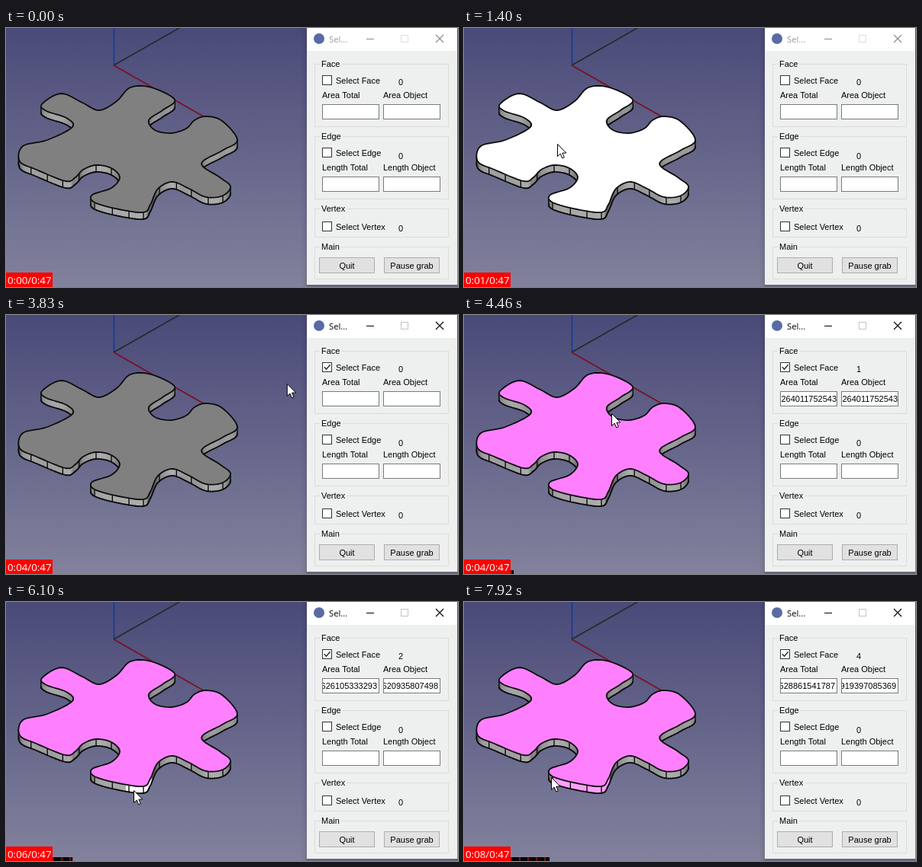
Write an HTML page with a canvas that moves like this. It is 592 px wide and 340 px high and loops after 8 s.

```html
<!DOCTYPE html>
<html lang="en">
<head>
<meta charset="utf-8">
<title>Face selection</title>
<style>
html, body { margin: 0; width: 100%; height: 100%; overflow: hidden; background: #65658b; }
canvas { display: block; }
</style>
</head>
<body>
<canvas id="stage" width="592" height="340"></canvas>
<script>
const ctx = document.getElementById('stage').getContext('2d');
const LOOP = 8000, TICK = 203, LEAD = 32;
const DEPTH = 9, INK = '#0c0c0c';
const SIDE_X = 116, SIDE_W = 21, SIDE_Y = 228;
const UI_FONT = '11px "Liberation Sans", Arial, sans-serif';
const AREAS = [
  ['', ''],
  ['264011752543', '264011752543'],
  ['626105333293', '620935807498'],
  ['627483437540', '770166446433'],
  ['528861541787', '919397085369']
];
const CLICKS = [22, 30, 32, 35];

// Pointer path: tick, x, y
const PATH = [
  [1, 372, 39], [4, 177, 108], [7, 122, 152], [8, 122, 152], [11, 385, 37], [13, 426, 77],
  [18, 426, 77], [22, 193, 129], [23, 193, 129], [26, 198, 220], [30, 167, 247],
  [34, 126, 238], [36, 126, 238], [38, 114, 230], [40, 114, 230]
];

// Key points of the top face, clockwise
const KNOTS = [
  [47, 100], [72, 86], [100, 98], [122, 108], [145, 96], [163, 78], [190, 78], [221, 94],
  [205, 108], [187, 121], [195, 134], [216, 138], [236, 132], [247, 121], [262, 116],
  [283, 122], [303, 147], [283, 161], [256, 178], [280, 196], [294, 208], [284, 220],
  [262, 222], [240, 211], [218, 202], [199, 211], [189, 232], [180, 242], [148, 238],
  [116, 229], [113, 219], [138, 210], [149, 196], [138, 184], [118, 180], [101, 186],
  [91, 196], [78, 201], [40, 186], [18, 175], [22, 155], [54, 147], [87, 130], [79, 118], [53, 109]
];

function spline(knots) {
  const n = knots.length, out = [];
  knots.forEach((b, i) => {
    const a = knots[(i + n - 1) % n], c = knots[(i + 1) % n], d = knots[(i + 2) % n];
    for (let j = 0; j < 8; j++) {
      const u = j / 8;
      out.push([0, 1].map(k => b[k] + 0.5 * u * (c[k] - a[k] + u * (2 * a[k] - 5 * b[k]
        + 4 * c[k] - d[k] + u * (3 * (b[k] - c[k]) + d[k] - a[k])))));
    }
  });
  return out;
}

function pathOf(points, closed) {
  const path = new Path2D();
  points.forEach(p => path.lineTo(p[0], p[1]));
  if (closed) path.closePath();
  return path;
}

const outline = spline(KNOTS);
const topFace = pathOf(outline, true);

function line(points, color, width = 1) {
  ctx.strokeStyle = color;
  ctx.lineWidth = width;
  ctx.stroke(pathOf(points));
}

function shape(path, fill, stroke, width = 1) {
  ctx.fillStyle = fill;
  ctx.fill(path);
  ctx.strokeStyle = stroke;
  ctx.lineWidth = width;
  ctx.stroke(path);
}

function box(x, y, w, h, fill, border) {
  ctx.fillStyle = fill;
  ctx.fillRect(x, y, w, h);
  if (border) frame(x, y, w, h, border);
}

function frame(x, y, w, h, color) {
  ctx.strokeStyle = color;
  ctx.lineWidth = 1;
  ctx.strokeRect(x + 0.5, y + 0.5, w - 1, h - 1);
}

function label(str, x, y, color = '#000', font = UI_FONT, align = 'left') {
  ctx.font = font;
  ctx.fillStyle = color;
  ctx.textAlign = align;
  ctx.fillText(str, x, y);
}

function pointerAt(tick) {
  const i = PATH.findIndex(key => key[0] > tick);
  if (i < 1) return null;
  const [a, b] = [PATH[i - 1], PATH[i]];
  const u = (tick - a[0]) / (b[0] - a[0]);
  return [1, 2].map(k => a[k] + (b[k] - a[k]) * u);
}

// Clickable side strips count from the right: 0, 1, 2
function sideAt(x, y) {
  const side = 2 - Math.floor((x - SIDE_X) / SIDE_W);
  return y > SIDE_Y && side < 3 ? Math.max(0, side) : -1;
}

function stateAt(tick) {
  const pointer = pointerAt(tick);
  const count = CLICKS.filter(c => tick >= c).length;
  const justClicked = tick >= CLICKS[0] && tick < CLICKS[0] + 2;
  const overTop = pointer && !justClicked && ctx.isPointInPath(topFace, ...pointer);
  return {
    tick, pointer, count,
    hoverSide: pointer && !overTop ? sideAt(...pointer) : -1,
    top: overTop ? '#ffffff' : count ? '#ff80ff' : '#808080',
    active: tick >= 15,
    overBox: tick >= 13 && tick <= 18
  };
}

function drawScene() {
  const sky = ctx.createLinearGradient(0, 0, 0, 340);
  sky.addColorStop(0, '#4a4a79');
  sky.addColorStop(1, '#82829d');
  box(0, 0, 592, 340, sky);
  line([[141.5, 0], [141.5, 49]], '#143a94', 1.6);
  line([[141, 49], [227, 0]], '#222b26', 1.6);
  line([[141, 49], [262, 118]], '#7c0f1e', 1.6);
}

function wallColor(x, y, facing, s) {
  const side = sideAt(x, y);
  if (side >= 0 && side === s.hoverSide) return '#ffffff';
  if (side >= 0 && side + 1 < s.count) return '#ffa2ff';
  const g = Math.round(82 + 92 * facing * facing);
  return `rgb(${g},${g},${g})`;
}

function drawPiece(s) {
  const down = p => [p[0], p[1] + DEPTH];
  const strip = x => Math.floor((x - SIDE_X) / SIDE_W);
  const walls = outline.map((a, i) => [a, outline[(i + 1) % outline.length]]);
  const isFront = ([a, b]) => b[0] < a[0];
  ctx.lineJoin = ctx.lineCap = 'round';

  walls.filter(isFront).forEach(([a, b]) => {
    const facing = (a[0] - b[0]) / Math.hypot(b[0] - a[0], b[1] - a[1]);
    const color = wallColor((a[0] + b[0]) / 2, a[1], facing, s);
    shape(pathOf([a, b, down(b), down(a)], true), color, color, 0.6);
  });
  walls.forEach((wall, i) => {
    const [a, b] = wall, front = isFront(wall);
    if (front) line([down(a), down(b)], INK, 1.8);
    const turns = front !== isFront(walls.at(i - 1));
    const seam = front && a[1] > 178 && strip(a[0]) !== strip(b[0]);
    if (turns || seam) line([a, down(a)], INK, 1.4);
  });
  shape(topFace, s.top, INK, 1.8);
  ctx.lineJoin = 'miter';
  ctx.lineCap = 'butt';
}

function group(name, y, h) {
  frame(404, y, 176, h, '#dadcdc');
  ctx.font = UI_FONT;
  box(411, y - 2, ctx.measureText(name).width + 4, 5, '#eef0f0');
  label(name, 413, y + 4);
}

function checkRow(name, y, value, valueY, checked, hot) {
  box(414, y, 13, 13, '#fff', hot ? '#2a6fa8' : '#333');
  if (checked) line([[416.8, y + 6.3], [419.5, y + 9.2], [424.6, y + 3.3]], '#222', 1.3);
  label(name, 432, y + 11);
  label(value, 514, valueY);
}

function fields(kind, y, texts, right) {
  ['Total', 'Object'].forEach((what, i) => {
    const x = 414 + i * 80;
    label(`${kind} ${what}`, x, y);
    box(x, y + 8, 75, 20, '#fff', '#7a7a7a');
    ctx.save();
    ctx.beginPath();
    ctx.rect(x + 1, y + 9, 73, 18);
    ctx.clip();
    label(texts[i], right + i * 80, y + 22, '#000', UI_FONT, 'right');
    ctx.restore();
  });
}

function button(name, x) {
  box(x, 301, 73, 21, '#e1e1e1', '#adadad');
  label(name, x + 36.5, 316, '#000', UI_FONT, 'center');
}

function drawTitleBar(active) {
  const ink = active ? '#000' : '#8a8a8a';
  box(394, 0, 197, 30, '#fff');
  ctx.beginPath();
  ctx.arc(410, 14, 7, 0, 7);
  ctx.fillStyle = '#5a6ba3';
  ctx.fill();
  label('Sel...', 423, 19, active ? '#000' : '#999', '11.2px "Open Sans", "Noto Sans", sans-serif');
  line([[472, 14.5], [482, 14.5]], ink);
  frame(517, 9, 10, 10, active ? '#c4c4c4' : '#dedede');
  line([[563, 9], [573, 19]], ink, 1.1);
  line([[573, 9], [563, 19]], ink, 1.1);
}

function drawWindow(s) {
  const shade = ctx.createLinearGradient(386, 0, 394, 0);
  shade.addColorStop(0, 'rgba(0,0,0,0)');
  shade.addColorStop(1, 'rgba(0,0,0,.1)');
  box(386, 0, 8, 340, shade);
  box(394, 337, 198, 3, 'rgba(0,0,0,.2)');
  box(394, 0, 197, 337, '#eef0f0');
  drawTitleBar(s.active);

  group('Face', 47, 83);
  checkRow('Select Face', 62, s.count, 75, s.active, s.overBox);
  fields('Area', 92, AREAS[s.count], s.count === 1 ? 488 : 486);
  group('Edge', 142, 83);
  checkRow('Select Edge', 157, 0, 172);
  fields('Length', 187, AREAS[0], 488);
  group('Vertex', 237, 38);
  checkRow('Select Vertex', 254, 0, 267);
  group('Main', 287, 43);
  button('Quit', 410);
  button('Pause grab', 495);
}

function drawTimer(tick) {
  const seconds = tick * TICK / 1000;
  const end = 4.4 + 13.6 * seconds;
  for (let x = 61; x < end; x += 11) {
    const w = Math.min(11, end - x);
    box(x, 335, w, 5, '#080404');
    box(x, 335, Math.min(2, w), 5, '#701010');
  }
  box(0, 321, 61, 19, '#ff0000');
  label(`0:0${Math.round(seconds)}/0:47`, 2, 336, '#fff', '13.3px "Open Sans", "Noto Sans", sans-serif');
}

const ARROW = pathOf([[0, 0], [0, 16], [3.7, 12.6], [6.2, 18.4], [8.8, 17.3], [6.3, 11.7], [11.3, 11.5]], true);
const HEAD = [[5, 2], [5, 5.5], [11, 0], [5, -5.5], [5, -2]];
const RESIZE = pathOf([...HEAD, ...HEAD.map(([x, y]) => [-x, -y])], true);

function drawPointer(s) {
  if (!s.pointer) return;
  const [x, y] = s.pointer;
  ctx.save();
  ctx.translate(x + 0.5, y + 0.5);
  shape(x > 394 ? RESIZE : ARROW, '#fff', '#000');
  ctx.restore();
}

function draw(time) {
  const tick = Math.floor((time % LOOP + LEAD) / TICK);
  const s = stateAt(tick);
  drawScene();
  drawPiece(s);
  drawWindow(s);
  drawTimer(tick);
  drawPointer(s);
}

const start = performance.now();
function loop() {
  draw(performance.now() - start);
  requestAnimationFrame(loop);
}
loop();
</script>
</body>
</html>
```
